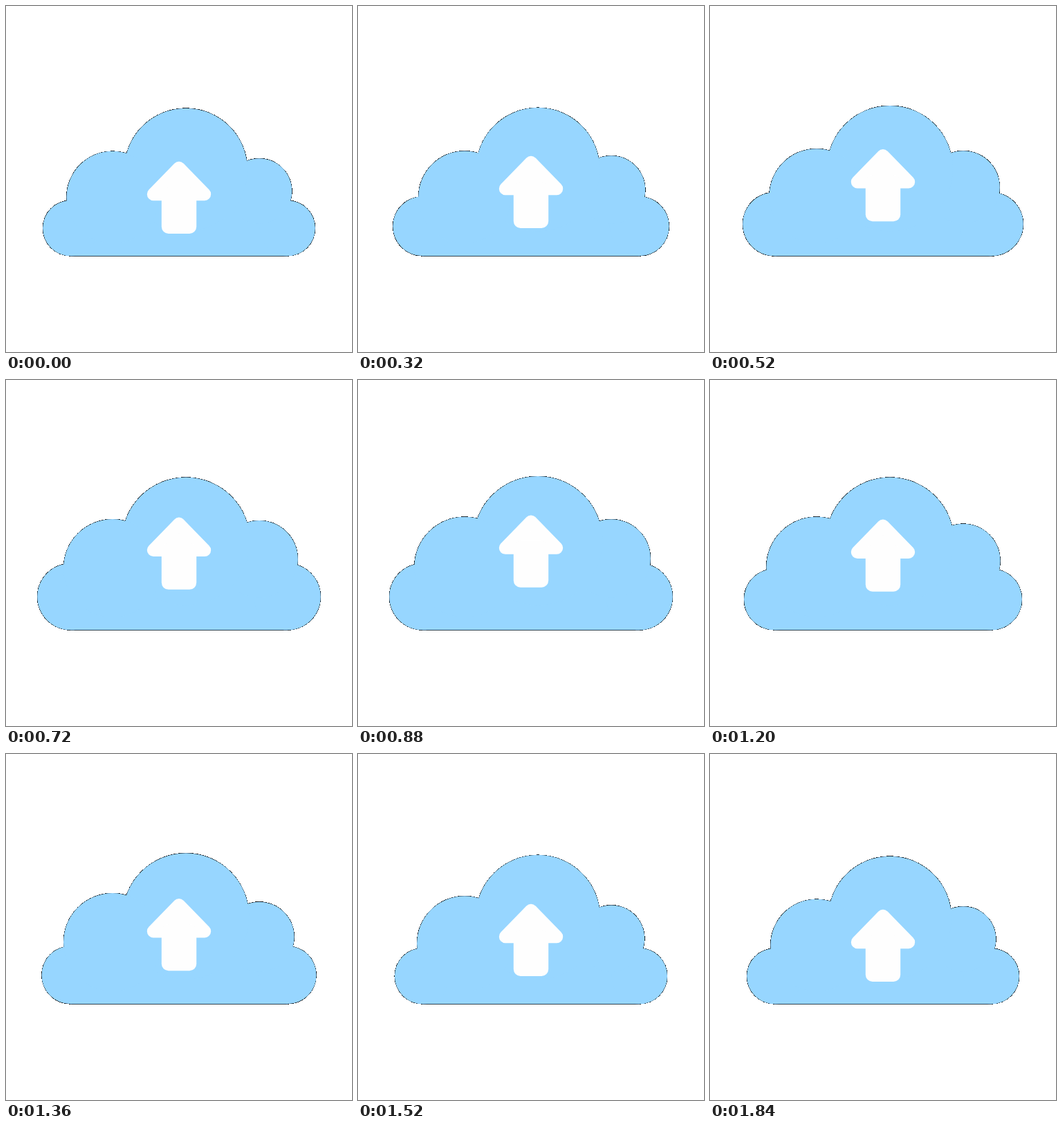
An HTML page that plays this animation: 500x500 px, repeating every 1920 ms.

```html
<!DOCTYPE html>
<html lang="en">
<head>
<meta charset="utf-8">
<title>Cloud upload</title>
<style>
  html, body { margin: 0; width: 100%; height: 100%; overflow: hidden; background: #fff; }
  svg { display: block; width: 100%; height: 100%; }
  #edge { shape-rendering: crispEdges; }
  #arrow { fill: #fefefe; }
</style>
</head>
<body>
<svg viewBox="0 0 500 500">
  <g id="edge" fill="#000"><rect x="93" y="290" width="314" height="72"/></g>
  <g id="body" fill="#97d6ff"><rect x="93" y="290" width="314" height="71.3"/></g>
  <g id="arrow">
    <path d="M250 234L287 272H213Z" stroke="#fefefe" stroke-width="18.4" stroke-linejoin="round"/>
    <rect x="224.8" y="262" width="50.4" height="67" rx="10"/>
  </g>
</svg>
<script>
const LOOP = 1920, STEP = 40, LIFT = 29.5;
const find = id => document.getElementById(id);

// Each puff grows upward from its fixed lowest point.
const puffs = [
  { x: 93.3, bottom: 361.5, r: 40.4, grow: 0.2, delay: 0 },
  { x: 406.7, bottom: 361.5, r: 40.4, grow: 0.2, delay: 0 },
  { x: 366, bottom: 315, r: 47.5, grow: 0.2, delay: 80 },
  { x: 260, bottom: 326, r: 89.25, grow: 0.05, delay: 160 },
  { x: 154, bottom: 343.2, r: 66.8, grow: 0.1, delay: 240 }
];

function addCircle(parent, x) {
  const c = document.createElementNS("http://www.w3.org/2000/svg", "circle");
  c.setAttribute("cx", x);
  return parent.appendChild(c);
}

for (const p of puffs) {
  p.outer = addCircle(find("edge"), p.x);
  p.inner = addCircle(find("body"), p.x);
}

// Smooth rise and fall between 0 and 1 over the given duration.
function swell(t, duration) {
  const u = Math.min(1, Math.max(0, t / duration));
  return (1 - Math.cos(2 * Math.PI * u)) / 2;
}

function setCircle(c, y, r) {
  c.setAttribute("cy", y);
  c.setAttribute("r", r);
}

// A soft blue body over a slightly larger hard black one leaves a thin outline.
function draw(now) {
  const t = Math.floor(now % LOOP / STEP) * STEP;
  for (const p of puffs) {
    const r = p.r * (1 + p.grow * swell(t - p.delay, 1600));
    setCircle(p.outer, p.bottom - r, r + 0.25);
    setCircle(p.inner, p.bottom - r, r - 0.2);
  }
  find("arrow").setAttribute("transform", `translate(0 ${-LIFT * swell(t, 1840)})`);
}

const start = performance.now();
function tick() {
  draw(performance.now() - start);
  requestAnimationFrame(tick);
}
tick();
</script>
</body>
</html>
```
